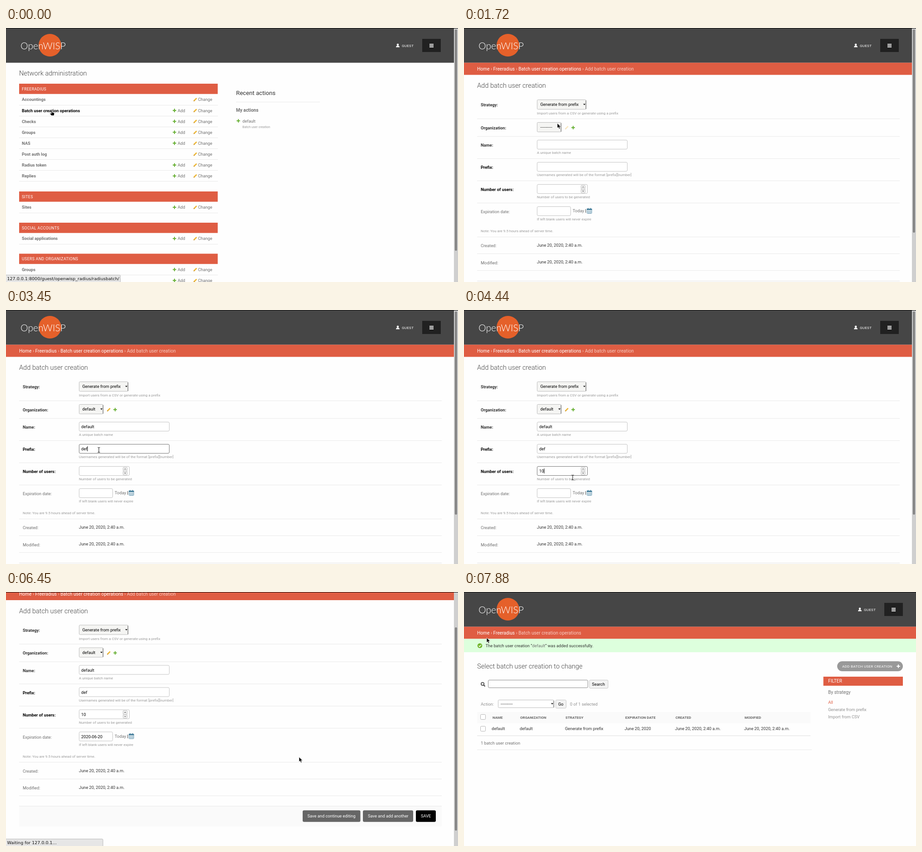
Animation of 998x561 px, one loop 8000 ms. Source, as an HTML page:

```html
<!DOCTYPE html>
<html lang="en">
<head>
<meta charset="utf-8">
<title>Batch user creation</title>
<style>
  html, body { margin: 0; width: 100%; height: 100%; overflow: hidden; background: #fefefe; }
  svg { display: block; width: 998px; height: 561px; }
  text { font: 9.3px Roboto, sans-serif; fill: #333; white-space: pre; }
  .title { font-size: 14.6px; font-weight: 300; fill: #444; }
  .bold { font-weight: 700; }
  .row { font-weight: 700; fill: #707070; }
  .dim { fill: #707070; }
  .pale { fill: #909090; }
  .black { fill: #000; }
  .white { fill: #fff; }
  .help { font-size: 8px; fill: #999; }
  .cap { font-size: 8.77px; letter-spacing: .37px; fill: #fff; }
  .head { font-size: 8px; font-weight: 700; fill: #666; }
  .tiny { font-size: 7.1px; fill: #999; }
  .crumb { font-size: 10.2px; fill: #fff; }
  .soft { fill: #f7cdc4; }
  .nav { font-size: 8px; letter-spacing: .3px; fill: #fff; }
  .mid { font-size: 10px; }
  .red { fill: #df5d43; }
  .dash { letter-spacing: .4px; }
  .sys { font: 9.5px "DejaVu Sans", sans-serif; fill: #111; }
  .recent { font-size: 13.2px; }
  .brand { font: 300 21px Lato, sans-serif; fill: #fff; }
</style>
</head>
<body>
<svg id="stage" viewBox="0 0 998 561"></svg>
<script>
const RED = '#df5d43', GREEN = '#68b035', AMBER = '#eeb93b';

const named = id => id ? `id="${id}"` : '';
const text = (x, y, s, cls = '', id = '') => `<text ${named(id)} x="${x}" y="${y}" class="${cls}">${s}</text>`;
const rect = (x, y, w, h, fill, more = '') => `<rect x="${x}" y="${y}" width="${w}" height="${h}" fill="${fill}" ${more}/>`;
const rule = (x1, x2, y, color = '#e9e9e9') => rect(x1, y, x2 - x1, 1, color);
const path = (d, more) => `<path d="${d}" ${more}/>`;
const group = (id, body) => `<g ${named(id)}>${body}</g>`;
const plus = (x, y, color = GREEN) => path(`M${x - 3.8} ${y}h7.6M${x} ${y - 3.8}v7.6`, `stroke="${color}" stroke-width="2.1"`);
const pencil = (x, y, id) => group(id,
  path(`M${x - 2.6} ${y + 2.4}L${x + 2.9} ${y - 2.9}`, `stroke="${AMBER}" stroke-width="2.8"`) +
  path(`M${x - 4} ${y + 4}l.6-2.8 2.2 2.2z`, 'fill="#c48d24"'));
const input = (id, x, y, w, h, stroke = '#c4c4c4') =>
  rect(x + .5, y + .5, w - 1, h, '#fff', `id="${id}Box" rx="2.5" stroke="${stroke}"`);
const field = (id, y, w) => input(id, 161, y, w, 20) + text(166, y + 14, '', 'black', id) +
  rect(166, y + 5, 1, 11, '#000', `id="${id}Caret"`);
const select = (id, x, y, w, h, value, fill = '#f5f5f3') =>
  rect(x + .5, y + .5, w - 1, h - 1, fill, 'rx="2" stroke="#bdbdbd"') +
  path(`M${x + w - .7} ${y + h - 1}V${y + 2}`, 'stroke="#666" stroke-width="1.2"') +
  path(`M${x + w - 6.8} ${y + h / 2 - 1.5}h5l-2.5 3z`, 'fill="#111"') +
  text(x + (h > 20 ? 7.5 : 6), y + h / 2 + 3.3, value, 'black dash', id);
const popup = (id, x, y, w, options, picked) => group(id,
  rect(x + .5, y + .5, w, options.length * 14.6 + 2, '#fff', 'stroke="#bbb"') +
  rect(x + 1, y + 2 + picked * 14.6, w - 1, 14.2, '#eee') +
  options.map((s, i) => text(x + 5, y + 12.4 + i * 14.6, s, 'sys')).join(''));
const button = (x, y, w, label, tx, fill, id = '') =>
  rect(x, y, w, 25.5, fill, `rx="3" ${named(id)}`) + text(tx, y + 16, label, 'white');
const smallButton = (x, y, w, label) =>
  rect(x + .5, y + .5, w - 1, 18, '#f3f3f3', 'rx="2" stroke="#c6c6c6"') + text(x + 6, y + 12.8, label, 'black');

function header() {
  const bars = [35, 38, 41].map(y => rect(935, y, 9, 1.7, '#fff')).join('');
  return rect(0, 0, 998, 76.7, '#464646') +
    '<circle cx="97" cy="38" r="25" fill="#e5602a"/>' + text(32, 46.5, 'OpenWISP', 'brand') +
    group('nav', '<circle cx="865" cy="36.8" r="2.3" fill="#fff"/>' +
      path('M861 42.5q0-3.6 4-3.6t4 3.6z', 'fill="#fff"') +
      text(874, 42, 'GUEST', 'nav') + rect(919, 24, 41, 29, '#212121') + bars);
}

function crumbs(last, ...links) {
  const trail = links.map(s => s + '<tspan class="soft"> › </tspan>').join('');
  return rect(0, 76.7, 998, 26.8, RED) + text(29, 93.5, `${trail}<tspan class="soft">${last}</tspan>`, 'crumb');
}

function dashboard() {
  const modules = [
    [123, 'FREERADIUS', ['-Accountings', 'Batch user creation operations', 'Checks', 'Groups', 'NAS',
      '-Post auth log', 'Radius token', 'Replies']],
    [361, 'SITES', ['Sites']],
    [430, 'SOCIAL ACCOUNTS', ['Social applications']],
    [498.5, 'USERS AND ORGANIZATIONS', ['Groups', 'Users']]
  ];
  const row = (name, y) => {
    const fixed = name[0] === '-', label = fixed ? name.slice(1) : name, hot = label.startsWith('Batch');
    return text(35, y + 3.4, label, 'row', hot ? 'batchLink' : '') +
      (fixed ? '' : plus(372, y) + text(379, y + 3.4, 'Add', 'dim', hot ? 'addLink' : '')) +
      pencil(418, y) + text(424, y + 3.4, 'Change', 'dim') + rule(29, 468, Math.round(y + 11.5));
  };
  return text(29, 105, 'Network administration', 'title') +
    modules.map(([y, name, rows]) => rect(29, y, 438.5, 22.7, RED) + text(35, y + 14.8, name, 'cap') +
      rows.map((r, i) => row(r, y + 35 + i * 24.1)).join('')).join('') +
    text(508, 147.6, 'Recent actions', 'recent') + rule(508, 693, 163) +
    text(508, 185, 'My actions', 'row mid') + plus(513, 205) +
    text(522, 208.7, 'default', 'dim') + text(522, 220.5, 'Batch user creation', 'tiny');
}

function form() {
  const line = y => rule(29, 962, y);
  const label = (y, s, cls = 'bold') => text(37, y, s, cls);
  const help = (y, s) => text(161, y, s, 'help');
  const date = 'June 20, 2020, 2:40 a.m.';
  const spinner = [347, 355.5].map((y, i) =>
    rect(258.5, y + .5, 9, 8, '#f6f6f6', 'rx="1" stroke="#bbb"') +
    path(i ? `M261 ${y + 3.5}l2 2 2-2` : `M261 ${y + 5.5}l2-2 2 2`, 'fill="none" stroke="#222"')).join('');
  const calendar = rect(271.5, 399.5, 10.5, 10, '#fff', 'rx="1" stroke="#5b90ab"') +
    rect(271, 399, 11.5, 3, '#447e9b') + path('M274 397.5v3M279.5 397.5v3', 'stroke="#447e9b" stroke-width="1.5"') +
    path('M272 404.7h10M272 407.2h10M274.5 402v7M277 402v7M279.5 402v7', 'stroke="#6d9db5" stroke-width=".7"');
  const more = label(262, 'Name:') + field('name', 247, 200) + help(278, 'A unique batch name') + line(288) +
    label(311, 'Prefix:', 'bold black') + field('prefix', 296, 200) +
    help(327, 'Usernames generated will be of the format [prefix][number]') + line(337) +
    label(360, 'Number of users:', 'bold black') + field('count', 345, 112) + spinner +
    help(376, 'Number of users to be generated') + line(386) +
    label(409, 'Expiration date:', 'dim') + field('date', 394, 75) +
    text(240, 407, 'Today <tspan class="black">|</tspan>', 'dim') + calendar +
    help(425, 'If left blank users will never expire') +
    text(37, 451, 'Note: You are 9.5 hours ahead of server time.', 'help') + line(461);
  const tail = label(262, 'Created:', 'dim') + text(161, 261, date) + line(276) +
    label(299.5, 'Modified:', 'dim') + text(161, 298.3, date) + line(313) +
    rect(29, 336, 933, 45, '#fafafa') + line(336) +
    button(655, 345.7, 127.5, 'Save and continue editing', 665.5, '#666') +
    button(788, 345.7, 111, 'Save and add another', 799, '#666') +
    button(905, 345.7, 44, 'SAVE', 916, '#333', 'save');
  const matches = ['default', 'defaul2-2', 'default-2', 'default-management-vpn2', 'default1', 'default2'];
  return crumbs('Add batch user creation', 'Home', 'Freeradius', 'Batch user creation operations') +
    text(29, 132, 'Add batch user creation', 'title') +
    label(173, 'Strategy:') + select('strategy', 161, 158, 109, 22, '') +
    help(191, 'Import users from a CSV or generate using a prefix') + line(200) +
    label(223.5, 'Organization:') + select('org', 161, 208, 54, 22, '') +
    pencil(227, 220, 'orgEdit') + plus(241, 220) + line(239) +
    group('more', more) + group('tail', tail) +
    popup('strategyMenu', 161, 180, 118, ['---------', 'Generate from prefix', 'Import from CSV'], 1) +
    popup('orgMenu', 161, 230, 70, ['---------', 'default'], 1) +
    group('nameMenu', popup('', 161, 268, 199, matches, 0) +
      rect(350.5, 269, 9, 89, '#cfcfcf') + rect(352.5, 272, 5, 38, '#858585', 'rx="2"'));
}

function list() {
  const check = y => rect(36.5, y + .5, 11, 11, '#fff', 'rx="2" stroke="#b5b5b5"');
  const heads = { NAME: 63, ORGANIZATION: 124, STRATEGY: 224, 'EXPIRATION DATE': 356, CREATED: 467, MODIFIED: 619.5 };
  const date = 'June 20, 2020, 2:40 a.m.';
  return crumbs('Batch user creation operations', 'Home', 'Freeradius') +
    rect(0, 103.5, 998, 29.5, '#dfd') + '<circle cx="35" cy="118.5" r="5.3" fill="#70b52b"/>' +
    path('M32.5 118.6l2 2 3.4-3.8', 'fill="none" stroke="#fff" stroke-width="1.5"') +
    text(47.5, 122, 'The batch user creation “<tspan class="dim">default</tspan>” was added successfully.') +
    text(29, 168.5, 'Select batch user creation to change', 'title') +
    rect(824, 153, 145, 22, '#999', 'rx="11"') + text(835, 166.8, 'ADD BATCH USER CREATION', 'nav') + plus(959, 164, '#fff') +
    '<circle cx="41" cy="203" r="3.2" fill="none" stroke="#444" stroke-width="1.6"/>' +
    path('M43.3 205.3l3.2 3.2', 'stroke="#444" stroke-width="2"') +
    input('search', 53, 194, 221, 17, '#8c8c8c') + smallButton(276.5, 194, 42, 'Search') +
    text(37, 251, 'Action:', 'pale') + select('', 75, 238, 124, 18, '---------', '#fff') + smallButton(202, 238, 24, 'Go') +
    text(234, 251, '0 of 1 selected', 'pale') +
    rect(29, 265, 736, 25, '#fafafa') + check(270) +
    Object.entries(heads).map(([s, x]) => text(x, 280, s, 'head')).join('') +
    check(296) + text(61, 305.4, 'default', 'row') + text(123, 305.4, 'default') +
    text(223, 305.4, 'Generate from prefix') + text(354.5, 305.4, 'June 20, 2020') +
    text(466, 305.4, date) + text(618.5, 305.4, date) + rule(29, 765, 317, '#ddd') +
    text(37, 337, '1 batch user creation', 'dim') + rule(29, 768, 348) +
    rect(793.5, 187, 175.5, 20, RED) + text(804, 200.4, 'FILTER', 'crumb') +
    text(804, 225, 'By strategy', 'mid dim') + text(804, 247, 'All', 'red') +
    text(804, 263, 'Generate from prefix', 'pale') + text(804, 279, 'Import from CSV', 'pale');
}

const pointers =
  group('arrow', path('M0 0v10.6l2.4-2.2 1.8 4 1.9-.9-1.8-3.8h3.4z', 'fill="#000" stroke="#fff" stroke-width=".7"')) +
  group('hand', path('M-1 0q1.2-.8 2 .4v4l4 .8q1 .3.8 1.6l-.9 4.5h-5.6l-3.6-4.3q.7-1.5 2.3-.4l1 .7z',
    'fill="#000" stroke="#fff" stroke-width=".7"')) +
  group('beam', path('M-2.5-5.5q2.5 0 2.5 1.5V4q0 1.5-2.5 1.5M2.5-5.5Q0-5.5 0-4M0 4q0 1.5 2.5 1.5',
    'fill="none" stroke="#222" stroke-width="1.1"'));

document.getElementById('stage').innerHTML =
  group('page', header() + group('dashboard', dashboard()) + group('form', form()) + group('list', list())) +
  group('scrollbar', rect(989, 0, 9, 561, '#cfcfcf') + rect(991, 3, 5, 489, '#858585', 'rx="2.5" id="thumb"')) +
  group('status', rect(-2, 545.5, 100, 20, '#e6e6e6', 'id="statusBox" rx="2" stroke="#b9b9b9"') +
    text(2.5, 556.5, '', 'sys', 'statusText')) +
  rect(0, 0, 998, 1, '#0a0a0a') + pointers;

const $ = id => document.getElementById(id);
const show = (id, on) => { $(id).style.display = on ? '' : 'none'; };
const move = (id, x, y) => $(id).setAttribute('transform', `translate(${x} ${y})`);

// Pointer and scroll way points: [tick, value, ...]
const pointerTrack = [[0, 101, 182], [1, 103, 182], [4, 382, 180], [5, 380, 181], [6, 317, 194], [8, 230, 170],
  [9, 230, 170], [10, 222, 202], [11, 222, 202], [13, 190, 219], [14, 188, 252], [16, 200, 258], [17, 196, 264],
  [18, 190, 278], [19, 190, 278], [21, 200, 307], [24, 205, 309], [27, 225, 356], [31, 240, 370], [32, 240, 370],
  [34, 252, 403], [35, 252, 403], [38, 861, 456], [40, 925, 458], [42, 925, 458], [48, 369, 271], [54, 50, 101], [56, 50, 101]];
const scrollTrack = [[35, 0], [37, 122], [43, 122], [45, 85.5], [56, 85.5]];

function sample(track, tick) {
  const i = track.findIndex(k => k[0] > tick);
  if (i < 1) return (i ? track[track.length - 1] : track[0]).slice(1);
  const [a, b] = [track[i - 1], track[i]], u = (tick - a[0]) / (b[0] - a[0]);
  return a.slice(1).map((v, k) => v + (b[k + 1] - v) * u);
}
const latest = (steps, tick) => steps.reduce((v, [at, next]) => tick >= at ? next : v, '');

const fields = {
  name: { focus: [16, 20], steps: [[17, 'd'], [18, 'de'], [19, 'default']] },
  prefix: { focus: [21, 26], steps: [[22, 'd'], [23, 'de'], [24, 'def']] },
  count: { focus: [27, 34], steps: [[29, '1'], [30, '10']] },
  date: { focus: [35, 41], steps: [[35, '2020-06-20']] }
};
const base = '127.0.0.1:8000/guest/openwisp_radius/radiusbatch/';
const statuses = [[0, base], [2, ''], [4, base + 'add/'], [5, ''], [38, base + 'add/#'], [39, ''],
  [41, 'Waiting for 127.0.0.1…'], [50, '']];
const shapes = [[0, 'hand'], [2, 'arrow'], [4, 'hand'], [5, 'arrow'], [16, 'beam'], [18, 'arrow'], [20, 'beam'],
  [33, 'arrow'], [34, 'hand'], [36, 'arrow'], [38, 'hand'], [39, 'arrow'], [40, 'hand'], [43, 'arrow']];

function draw(tick) {
  const view = tick < 5 ? 'dashboard' : tick < 50 ? 'form' : 'list';
  const long = tick >= 11, chosen = tick >= 15;
  ['dashboard', 'form', 'list'].forEach(id => show(id, id === view));

  const scroll = view === 'form' ? sample(scrollTrack, tick)[0] : 0;
  move('page', 0, -scroll);
  move('nav', view === 'list' ? 9 : 0, 0);
  show('scrollbar', view !== 'list');
  $('thumb').setAttribute('y', 3 + scroll * .877);
  $('thumb').setAttribute('height', view === 'dashboard' ? 489 : long ? 449 : 509);

  $('batchLink').style.fill = tick < 2 ? '#000' : '';
  $('addLink').style.fill = tick === 4 ? '#000' : '';

  show('more', long);
  move('tail', 0, long ? 222 : 0);
  $('strategy').textContent = long ? 'Generate from prefix' : '---------';
  $('strategy').classList.toggle('dash', !long);
  $('org').textContent = chosen ? 'default' : '---------';
  $('org').classList.toggle('dash', !chosen);
  $('orgEdit').style.opacity = chosen ? 1 : .3;
  show('strategyMenu', tick === 9 || tick === 10);
  show('orgMenu', tick === 13 || tick === 14);
  show('nameMenu', tick === 17 || tick === 18);
  $('save').setAttribute('fill', tick >= 40 ? '#000' : '#333');

  for (const [id, { focus, steps }] of Object.entries(fields)) {
    const active = tick >= focus[0] && tick < focus[1];
    $(id).textContent = latest(steps, tick);
    $(id + 'Box').setAttribute('stroke', active ? '#777' : '#c4c4c4');
    show(id + 'Caret', active);
    if (active) $(id + 'Caret').setAttribute('x', 166 + $(id).getComputedTextLength());
  }

  const status = latest(statuses, tick);
  show('status', status);
  $('statusText').textContent = status;
  if (status) {
    const width = status.startsWith('W') ? 214 : $('statusText').getComputedTextLength() + 5;
    $('statusBox').setAttribute('width', width + 2);
  }

  const shape = latest(shapes, tick);
  ['arrow', 'hand', 'beam'].forEach(id => show(id, id === shape));
  move(shape, ...sample(pointerTrack, tick));
}

const start = performance.now();
let shown = -1;
function loop() {
  const tick = Math.floor(((performance.now() - start) % 8000 + 8) / 143.3);
  if (tick !== shown) draw(shown = tick);
  requestAnimationFrame(loop);
}
loop();
</script>
</body>
</html>
```
